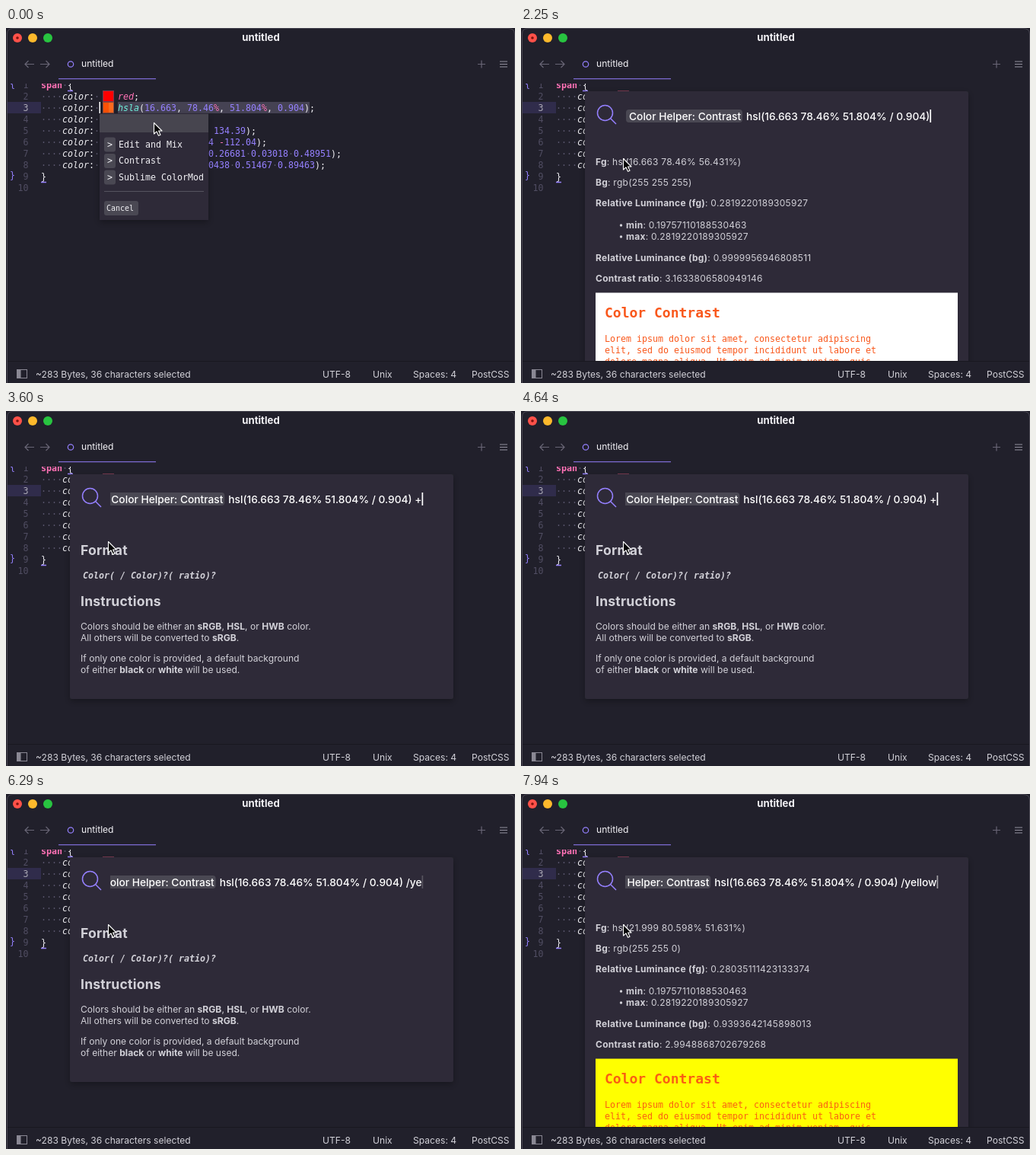
An HTML page that plays this animation: 669 by 466 pixels, repeating every 8000 ms.

```html
<!DOCTYPE html>
<html lang="en">
<head>
<meta charset="utf-8">
<title>untitled</title>
<style>
  html, body { margin: 0; width: 100%; height: 100%; overflow: hidden; background: #21202b; }
  svg { display: block; width: 669px; height: 466px; }
  text { font: 12.1px Inter, "Open Sans", sans-serif; fill: #f2f1f5; white-space: pre; }
  .mono text { font: 11.63px "DejaVu Sans Mono", monospace; }
  .bold, .mono text.bold { font-weight: 700; }
  .italic, .mono text.italic { font-style: italic; }
  .pink { fill: #ff72b6; }
  .cyan { fill: #6ff2de; }
  .num { fill: #9580ff; }
  .dim { fill: #5b576f; }
  .body text { fill: #d2d1d8; }
  #facts text { font-size: 12px; letter-spacing: .25px; }
  #input text { font-size: 13.75px; font-weight: 500; fill: #fff; }
  .body text.heading { font-size: 17.6px; font-weight: 700; letter-spacing: .2px; }
  .mono text.sample { font-size: 18px; font-weight: 700; }
  #sample text { fill: inherit; }
</style>
</head>
<body>
<svg viewBox="0 0 669 466">
  <defs>
    <clipPath id="editorClip"><rect x="0" y="73" width="669" height="364"/></clipPath>
    <clipPath id="inputClip"><rect x="137" y="100" width="412" height="32"/></clipPath>
    <filter id="shadow" x="-20%" y="-20%" width="140%" height="140%">
      <feDropShadow dx="0" dy="3" stdDeviation="5" flood-color="#000" flood-opacity=".32"/>
    </filter>
  </defs>
  <rect width="669" height="466" fill="#21202b"/>

  <!-- Title and tab bar -->
  <path d="M1.5 466V8Q1.5 .5 9 .5H660Q668.5 .5 668.5 8V466" fill="none" stroke="#4b4954"/>
  <circle cx="15" cy="13" r="6" fill="#ff5149"/>
  <circle cx="15" cy="13" r="1.800" fill="#7c130e"/>
  <circle cx="35" cy="13" r="6" fill="#fdb92c"/>
  <circle cx="55" cy="13" r="6" fill="#28c440"/>
  <text x="335" y="17" text-anchor="middle" style="font-size:13.2px;font-weight:700">untitled</text>
  <g fill="none" stroke="#686575" stroke-width="1.200">
    <path d="M37 47.500H25M29.500 43L25 47.500L29.500 52M45 47.500H57M52.500 43L57 47.500L52.500 52"/>
    <path d="M620 47.500H630M625 42.500V52.500"/>
    <path d="M649 44H659M649 47.500H659M649 51H659" stroke="#94929f"/>
    <circle cx="85" cy="47.500" r="3.700" stroke="#9580ff"/>
  </g>
  <text x="99" y="51">untitled</text>
  <rect x="69" y="66" width="128" height="1.300" fill="#7a69ce"/>

  <g clip-path="url(#editorClip)">
    <g id="editor" class="mono">
      <rect x="2" y="97" width="44" height="15" fill="#302c4b"/>
      <rect x="147" y="97" width="252" height="15" fill="#454253"/>
      <g id="lines"></g>
      <text x="46" y="79"><tspan class="pink bold">span</tspan><tspan class="dim">·</tspan>{</text>
      <text x="46" y="199">}</text>
      <text x="5" y="77"><tspan class="num">{</tspan></text>
      <text x="5" y="197"><tspan class="num">}</tspan></text>
      <path d="M81 82.500H88M46 202.500H53" stroke="#9580ff" stroke-width="1.500"/>
      <text x="147" y="94"><tspan class="pink italic">red</tspan>;</text>
      <text x="147" y="109" id="hsla"></text>
      <text x="273" y="139"><tspan class="num">134.39</tspan>);</text>
      <text x="266" y="154"><tspan class="num">4</tspan> <tspan class="pink">-</tspan><tspan class="num">112.04</tspan>);</text>
      <text x="266" y="169"><tspan class="num">0.26681<tspan class="dim">·</tspan>0.03018<tspan class="dim">·</tspan>0.48951</tspan>);</text>
      <text x="266" y="184"><tspan class="num">0438<tspan class="dim">·</tspan>0.51467<tspan class="dim">·</tspan>0.89463</tspan>);</text>
      <rect x="127.500" y="82.500" width="14" height="14" fill="#fe0000" stroke="#7a3a50"/>
      <rect x="127.500" y="97.500" width="14" height="14" fill="#fc5206" stroke="#8a4a3a"/>
      <rect x="135" y="98" width="6" height="13" fill="#f96a1e"/>
      <rect id="editorCaret" x="122.500" y="97" width="1.500" height="15" fill="#fff"/>
    </g>

    <g id="menu" class="mono">
      <rect x="123" y="112" width="143" height="140" fill="#2e2c38" filter="url(#shadow)"/>
      <rect x="123" y="113" width="143" height="24" fill="#47454f"/>
      <g id="menuItems"></g>
      <path d="M129 214.500H260" stroke="#55535e"/>
      <rect x="129" y="227" width="45" height="19" rx="3" fill="#4a4853"/>
      <text x="132" y="240" style="font-size:10px">Cancel</text>
    </g>

    <g id="panel">
      <rect id="panelBox" x="84" y="83" width="504" rx="3" fill="#2e2c38" filter="url(#shadow)"/>
      <g fill="none" stroke="#9580ff" stroke-width="1.500">
        <circle cx="110.500" cy="111.500" r="10"/><path d="M117.500 118.500L125 126"/>
      </g>
      <g id="input" clip-path="url(#inputClip)">
        <g id="scroller">
          <rect x="138" y="107" width="153" height="17" rx="4" fill="#4a4853"/>
          <text x="142" y="121">Color Helper: Contrast</text>
          <rect id="selection" x="296" y="107" height="18" fill="#423e5b"/>
          <text id="query" x="296" y="121"></text>
          <rect id="caret" y="107" width="1.700" height="17" fill="#fff"/>
        </g>
      </g>
      <g id="report" class="body">
        <g id="facts"></g>
        <g id="sample" class="mono">
          <rect id="sampleBox" x="98" y="347.500" width="476" height="100"/>
          <text class="sample" x="110" y="380">Color Contrast</text>
          <text x="110" y="412">Lorem ipsum dolor sit amet, consectetur adipiscing</text>
          <text x="110" y="427">elit, sed do eiusmod tempor incididunt ut labore et</text>
          <text x="110" y="442">dolore magna aliqua. Ut enim ad minim veniam, quis</text>
        </g>
      </g>
      <g id="help" class="body">
        <text class="heading" x="98" y="189">Format</text>
        <g class="mono"><text class="bold italic" x="101" y="220">Color( / Color)?( ratio)?</text></g>
        <text class="heading" x="98" y="256">Instructions</text>
        <text x="98" y="287">Colors should be either an <tspan class="bold">sRGB</tspan>, <tspan class="bold">HSL</tspan>, or <tspan class="bold">HWB</tspan> color.</text>
        <text x="98" y="302">All others will be converted to <tspan class="bold">sRGB</tspan>.</text>
        <text x="98" y="329">If only one color is provided, a default background</text>
        <text x="98" y="344">of either <tspan class="bold">black</tspan> or <tspan class="bold">white</tspan> will be used.</text>
      </g>
    </g>
  </g>

  <!-- Status bar -->
  <rect x="2" y="437" width="666" height="1" fill="#191820"/>
  <rect x="14.500" y="448.500" width="13" height="11" fill="none" stroke="#8a8894"/>
  <rect x="15" y="449" width="4.500" height="10" fill="#8a8894"/>
  <g class="body">
    <text x="39" y="459">~283 Bytes, 36 characters selected</text>
    <text x="416" y="459">UTF-8</text>
    <text x="482" y="459">Unix</text>
    <text x="535" y="459">Spaces: 4</text>
    <text x="612" y="459">PostCSS</text>
  </g>

  <path id="pointer" d="M.5 .5V15L4 11.800L6.500 17.300L9 16.200L6.600 11H11Z" fill="#050505" stroke="#fff" stroke-width="1.100" stroke-linejoin="round"/>
</svg>

<script>
const LOOP = 8000, OPEN = 1050, DESELECT = 1500;
const $ = id => document.getElementById(id);
const span = (cls, s) => `<tspan class="${cls}">${s}</tspan>`;
const show = (id, on) => $(id).setAttribute('display', on ? 'inline' : 'none');

// Static rows
let rows = '';
for (let n = 1; n <= 10; n++) {
  const y = 64 + 15 * n;
  const color = n === 3 ? '#aaa8b4' : '#504d62';
  rows += `<text x="29.500" y="${y}" text-anchor="end" style="fill:${color}">${n}</text>`;
  if (n > 1 && n < 9) {
    rows += `<text x="46" y="${y}">${span('dim', '····')}${span('italic', 'color')}:${span('dim', '·')}</text>`;
  }
}
$('lines').innerHTML = rows;
const pct = s => span('num', s) + span('pink', '%');
$('hsla').innerHTML = span('cyan italic', 'hsla') +
  `(${span('num', '16.663')}, ${pct('78.46')}, ${pct('51.804')}, ${span('num', '0.904')});`;

$('menuItems').innerHTML = ['Edit and Mix', 'Contrast', 'Sublime ColorMod'].map((label, i) => {
  const y = 156.5 + 21.5 * i;
  return `<rect x="129" y="${y - 13}" width="15" height="19" rx="3" fill="#4a4853"/>
    <text x="133" y="${y}">&gt;</text><text x="148" y="${y}">${label}</text>`;
}).join('');

// Contrast reports
const reports = {
  white: { fg: 'hsl(16.663 78.46% 56.431%)', bg: 'rgb(255 255 255)', lum: '0.2819220189305927',
    bgLum: '0.9999956946808511', ratio: '3.1633806580949146', fill: '#ffffff', ink: '#f9581c' },
  yellow: { fg: 'hsl(21.999 80.598% 51.631%)', bg: 'rgb(255 255 0)', lum: '0.28035111423133374',
    bgLum: '0.9393642145898013', ratio: '2.9948868702679268', fill: '#ffff00', ink: '#fa5f12' }
};
function drawReport(r) {
  const fact = (y, label, value, x = 98) =>
    `<text x="${x}" y="${y}">${span('bold', label)}: ${value}</text>`;
  const dot = y => `<circle cx="131.500" cy="${y - 4}" r="1.700" fill="#d2d1d8"/>`;
  $('facts').innerHTML = fact(180, 'Fg', r.fg) + fact(207, 'Bg', r.bg) +
    fact(234, 'Relative Luminance (fg)', r.lum) +
    dot(263) + fact(262.5, 'min', '0.19757110188530463', 138) +
    dot(278) + fact(277.5, 'max', '0.2819220189305927', 138) +
    fact(306, 'Relative Luminance (bg)', r.bgLum) + fact(333, 'Contrast ratio', r.ratio);
  $('sampleBox').setAttribute('fill', r.fill);
  $('sample').style.fill = r.ink;
}

// Typing: time and what follows the color
const BASE = 'hsl(16.663 78.46% 51.804% / 0.904)';
const edits = [
  [OPEN, ''], [1200, ''], [2550, ' '], [3600, ' +'], [4040, ' +y'], [4340, ' +ye'],
  [4490, ' +y'], [4640, ' +'], [4790, ' '], [5240, ' /'], [5540, ' /y'], [5690, ' /ye'],
  [6440, ' /yel'], [6590, ' /yell'], [6890, ' /yello'], [7040, ' /yellow']
];
// The caret stays solid after an edit, then fades out and in
const FADE = [1, 1, .9, .55, .2, 0, .55, 1, 1];
const caretLevel = age => FADE[Math.floor(age / 150) % FADE.length];

let shown = null;
function setQuery(tail) {
  if (tail === shown) return;
  shown = tail;
  const query = $('query');
  query.textContent = (BASE + tail).replace(/ /g, '\u00a0');
  const end = 296 + query.getComputedTextLength();
  $('caret').setAttribute('x', end);
  $('selection').setAttribute('width', end - 296);
  $('scroller').setAttribute('transform', `translate(${Math.min(0, 546.5 - end)} 0)`);
  const kind = tail.trim() === '' ? 'white' : tail === ' /yellow' ? 'yellow' : null;
  show('report', kind);
  show('help', !kind);
  $('panelBox').setAttribute('height', kind ? 380 : 295);
  if (kind) drawReport(reports[kind]);
}

const GLIDE = [0, .2, .5, .78, .95, 1];
function draw(t) {
  const open = t >= OPEN;
  show('menu', !open);
  show('panel', open);
  const k = GLIDE[Math.min(5, Math.floor(t / 150))];
  $('pointer').setAttribute('transform', `translate(${194 - 60 * k} ${124 + 47 * k})`);
  $('editorCaret').setAttribute('opacity', caretLevel(t + 150));
  if (!open) return;
  const [at, tail] = edits.filter(e => e[0] <= t).pop();
  setQuery(tail);
  show('selection', t < DESELECT);
  $('caret').setAttribute('opacity', caretLevel(t - at));
}

const start = performance.now();
function tick() {
  draw((performance.now() - start) % LOOP);
  requestAnimationFrame(tick);
}
tick();
</script>
</body>
</html>
```
